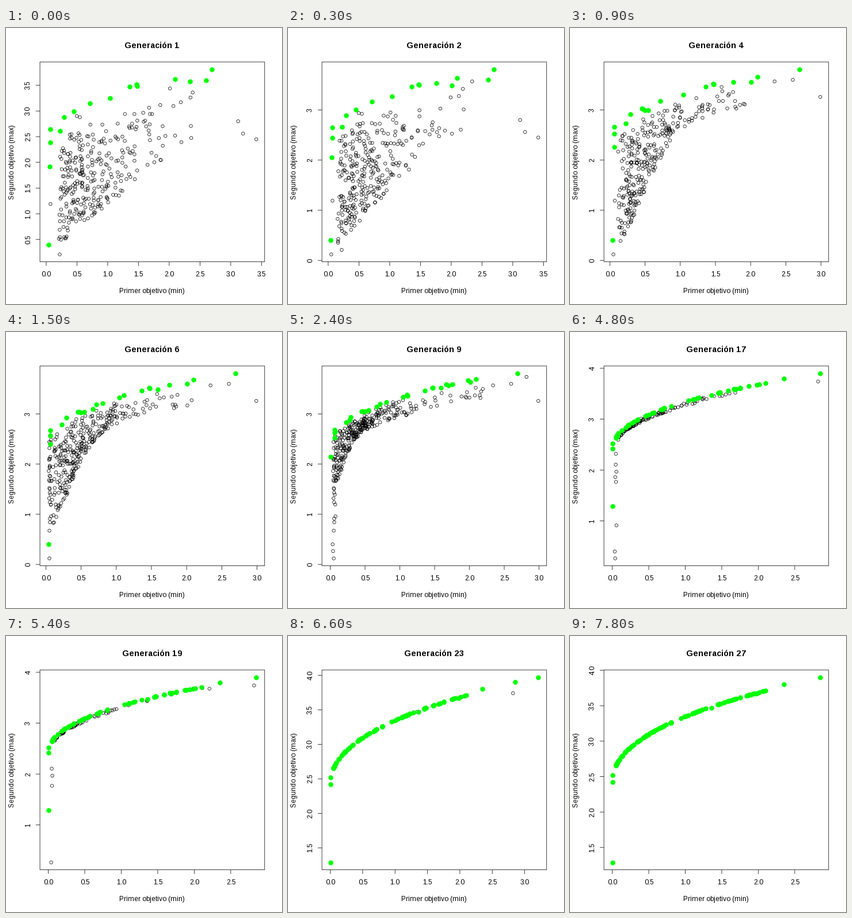
Recreate the animation shown at these times as a matplotlib script. Size 480 by 480 pixels, loop 8000 ms.

```python
import numpy as np
import matplotlib.pyplot as plt
from matplotlib.animation import FuncAnimation

plt.rcParams["font.family"] = "Liberation Sans"
plt.rcParams["text.hinting_factor"] = 1

SIZE, DPI = 480, 72
LEFT, RIGHT, TOP, BOTTOM = 59.04, 449.76, 59.04, 406.56
GENERATIONS, STEPS_PER_GEN, FRAMES = 27, 3, 80
LINE = .75

# Long-lived individuals: x, y, first and last generation.
LANDMARKS = np.array([
    (3.415, 2.45, 1, 3), (3.2, 2.56, 1, 3), (3.12, 2.8, 1, 3),
    (2.99, 3.26, 4, 12), (2.82, 3.74, 9, 23), (2.85, 3.9, 17, 27),
    (3.21, 3.97, 21, 26), (2.69, 3.81, 1, 16), (2.6, 3.6, 1, 13),
    (2.34, 3.57, 1, 13), (2.35, 3.8, 17, 27), (1.36, 3.47, 1, 27),
    (1.98, 3.67, 9, 27), (.034, .4, 1, 17), (.07, 1.19, 1, 7),
    (.22, .21, 1, 3), (.05, .12, 2, 15), (.04, .265, 9, 19),
    (0, 2.15, 7, 15), (0, 2.42, 11, 27), (0, 2.52, 16, 27), (0, 1.29, 16, 27),
])

# Depth of the cloud below the front: floor + bump * exp(-(x / width)^2).
DEPTH_GENS = 1, 4, 9, 13, 17, 23
DEPTH_FLOOR = 1.5, .6, .42, .18, .09, .03
DEPTH_BUMP = 1, 2, .8, .35, .3, .05
DEPTH_WIDTH = 1.6, .65, .25, .1, .06, .05


def best(x):
    """The trade-off curve the population converges to."""
    return 2.45 + .96 * np.sqrt(x) - .06 * x


def lag(x, gen):
    return .25 * np.exp((1 - gen) / 5) * (1 + .15 / x)


def leaders(gen):
    rng = np.random.default_rng(5)
    u, late = rng.random((2, 130))[:, :int(14 * 1.085 ** (gen - 1))]
    x = .05 + 2.05 * u ** 1.7
    return np.c_[x, best(x) - late * lag(x, gen)]


def followers(gen):
    rng = np.random.default_rng(100 + gen)
    n = int(300 / (1 + np.exp((gen - 16) / 2.2)))
    z = rng.normal(size=2 * n + 20)
    z = z[(z > -2) & (z < 1.9)][:n]
    median = .42 + .3 * np.exp((1 - gen) / 2)
    x = median * np.exp(z * min(.9, .65 + .035 * (gen - 1)))
    floor, bump, width = (np.interp(gen, DEPTH_GENS, values) for values
                          in (DEPTH_FLOOR, DEPTH_BUMP, DEPTH_WIDTH))
    top = 1.2 * lag(x, gen)
    gap = np.maximum(floor + bump * np.exp(-(x / width) ** 2) - top, .01)
    return np.c_[x, best(x) - top - gap * rng.random(n) ** .75]


def stragglers(gen):
    """A thin column near x = 0 that dies out slowly."""
    rng = np.random.default_rng(8)
    u, v, end = rng.random((3, 28))
    alive = (gen >= 5) & (gen < 9 + 13 * end)
    return np.c_[.04 + .04 * u, .3 + 2.2 * v ** .6][alive]


def outclassed(some, everyone):
    """True where an individual is clearly beaten in both objectives."""
    better_x = everyone[None, :, 0] < some[:, None, 0]
    better_y = everyone[None, :, 1] > some[:, None, 1] + .05
    return (better_x & better_y).any(1)


def individuals(gen):
    """Return (front, rest) of one generation."""
    alive = (LANDMARKS[:, 2] <= gen) & (gen <= LANDMARKS[:, 3])
    elite = np.vstack([LANDMARKS[alive, :2], leaders(gen)])
    beaten = outclassed(elite, elite)
    rest = np.vstack([followers(gen), stragglers(gen), elite[beaten]])
    return elite[~beaten], rest


def limits(values):
    low, high = values.min(), values.max()
    margin = .04 * (high - low)
    return low - margin, high + margin


def tick_values(low, high):
    step = 1 if high - low > 3.905 else .5
    first, last = int(np.ceil(low / step)), int(np.floor(high / step))
    return np.arange(first, last + 1) * step, "%d" if step == 1 else "%.1f"


fig = plt.figure(figsize=(SIZE / DPI, SIZE / DPI), dpi=DPI, facecolor="white")
ax = fig.add_axes([0, 0, 1, 1])
ax.set(xlim=(0, SIZE), ylim=(SIZE, 0))
ax.axis("off")


def label(x, y, text="", size=12, **style):
    return ax.text(x, y, text, size=size, ha="center", va="baseline",
                   rotation_mode="anchor", **style)


def line(x=(), y=()):
    return ax.plot(x, y, color="black", lw=LINE, snap=False,
                   solid_joinstyle="miter", solid_capstyle="butt")[0]


MID_X, MID_Y = (LEFT + RIGHT) / 2, (TOP + BOTTOM) / 2
title = label(MID_X, 35, size=14.4, weight="bold")
label(MID_X, 461, "Primer objetivo (min)")
label(14, MID_Y, "Segundo objetivo (max)", rotation=90)
line([LEFT, RIGHT, RIGHT, LEFT, LEFT], [TOP, TOP, BOTTOM, BOTTOM, TOP])

x_labels = [label(0, 432) for _ in range(10)]
y_labels = [label(42, 0, rotation=90) for _ in range(10)]
x_marks = [line() for _ in x_labels]
y_marks = [line() for _ in y_labels]
rest_dots = ax.scatter([], [], s=5.4 ** 2, facecolors="none", snap=False,
                       edgecolors="black", linewidths=LINE, zorder=3)
front_dots = ax.scatter([], [], s=8.5 ** 2, color="#00ff00", linewidths=0,
                        snap=False, antialiased=False, zorder=4)


def draw(frame):
    gen = min(frame // STEPS_PER_GEN + 1, GENERATIONS)
    front, rest = individuals(gen)
    everyone = np.vstack([front, rest])
    x_lim, y_lim = limits(everyone[:, 0]), limits(everyone[:, 1])

    def to_x(v):
        return LEFT + (v - x_lim[0]) / (x_lim[1] - x_lim[0]) * (RIGHT - LEFT)

    def to_y(v):
        return BOTTOM - (v - y_lim[0]) / (y_lim[1] - y_lim[0]) * (BOTTOM - TOP)

    for dots, group in ((rest_dots, rest), (front_dots, front)):
        dots.set_offsets(np.c_[to_x(group[:, 0]), to_y(group[:, 1])])

    for item in x_labels + y_labels + x_marks + y_marks:
        item.set_visible(False)
    ticks, form = tick_values(*x_lim)
    for value, text, mark in zip(ticks, x_labels, x_marks):
        x = to_x(value)
        text.set(x=x, text=form % value, visible=True)
        mark.set(data=([x, x], [BOTTOM, BOTTOM + 7.2]), visible=True)
    ticks, form = tick_values(*y_lim)
    for value, text, mark in zip(ticks, y_labels, y_marks):
        y = to_y(value)
        text.set(y=y, text=form % value, visible=True)
        mark.set(data=([LEFT - 7.2, LEFT], [y, y]), visible=True)
    title.set_text(f"Generación {gen}")
    return []


anim = FuncAnimation(fig, draw, frames=FRAMES, init_func=lambda: [],
                     interval=100, repeat=True, repeat_delay=0, blit=False)
plt.show()
```
